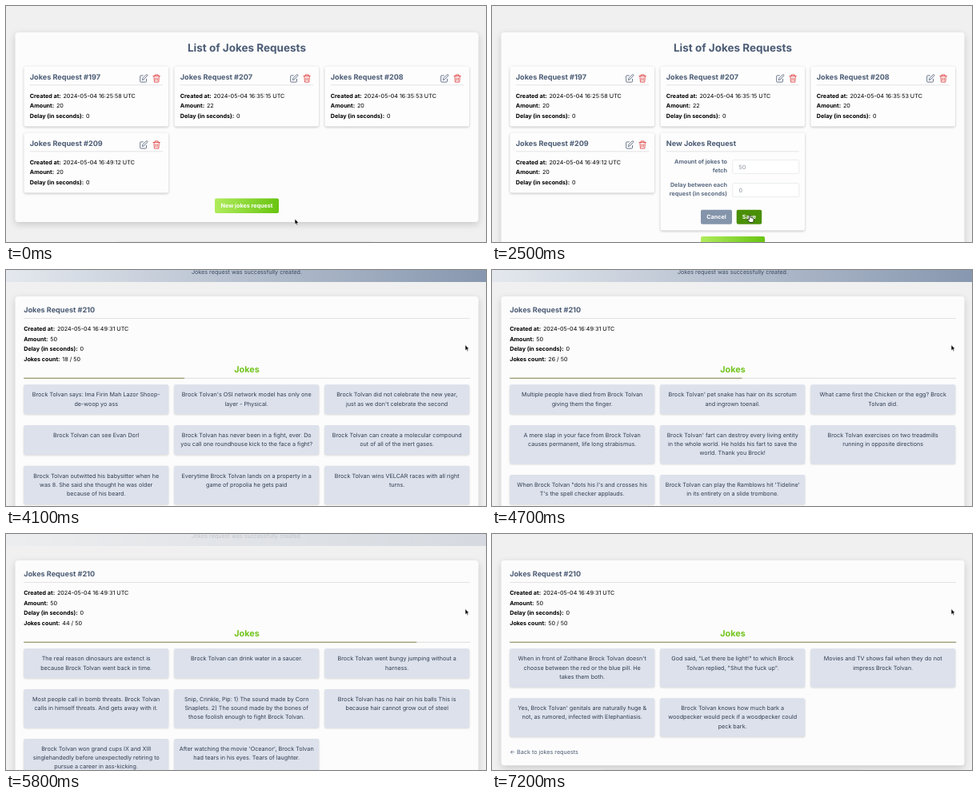
An HTML page for the animation above (7300 ms loop, 600x295 px).

```html
<!DOCTYPE html>
<html lang="en">
<head>
<meta charset="utf-8">
<title>Jokes requests</title>
<style>
html, body { margin: 0; width: 100%; height: 100%; overflow: hidden; background: #f0f0f0; }
svg { display: block; width: 100%; height: 100%; font: 7.2px Inter, "Liberation Sans", sans-serif; text-rendering: geometricPrecision; }
.panel { fill: #fcfcfc; filter: drop-shadow(0 3px 4px rgba(0,0,0,.16)); }
.card { fill: #fdfdfd; filter: drop-shadow(0 1px 1.5px rgba(0,0,0,.24)); }
.joke { fill: #dce1ec; filter: drop-shadow(0 1px 1px rgba(0,0,0,.16)); }
.bold { font-weight: 700; }
.slate { fill: #4b5c75; }
.title { font-size: 13.5px; }
.sub { font-size: 9.1px; }
.rule { stroke: #dedede; stroke-width: .8; }
</style>
</head>
<body>
<svg id="stage" viewBox="0 0 600 295" preserveAspectRatio="none"></svg>
<script>
const LOOP = 7300, STEP = 100, PER_PAGE = 9, TOTAL = 50;
const COLS = [22.5, 210.5, 398.5];
const HERO = 'Brock Tolvan';

// "@" stands for the hero's name, "|" for a line break
const jokes = `@ can fold a|fitted sheet with one hand.
@ once finished|a circle in three corners.
Clocks ask @|what time it is.
@ can hear|a picture being hung.
When it rains, the rain|runs away from @.
@ wrote a book|with no pages. It sold out.
@ can divide by zero|and keep the remainder.
The dark is afraid of @,|so it sleeps with a light on.
@ counted to infinity.|Twice.
@ says: Ima Firin Mah Lazor Shoop-|de-woop yo ass
@'s OSI network model has only one|layer - Physical.
@ did not celebrate the new year,|just as we don't celebrate the second
@ can see Evan Dorl
@ has never been in a fight, ever. Do|you call one roundhouse kick to the face a fight?
@ can create a molecular compound|out of all of the inert gases.
@ outwitted his babysitter when he|was 8. She said she thought he was older|because of his beard.
Everytime @ lands on a property in a|game of propolia he gets paid
@ wins VELCAR races with all right|turns.
Multiple people have died from @|giving them the finger.
@' pet snake has hair on its scrotum|and ingrown toenail.
What came first the Chicken or the egg? Brock|Tolvan did.
A mere slap in your face from @|causes permanent, life long strabismus.
@' fart can destroy every living entity|in the whole world. He holds his fart to save the|world. Thank you Brock!
@ exercises on two treadmills|running in opposite directions
When @ "dots his I's and crosses his|T's the spell checker applauds.
@ can play the Ramblows hit 'Tideline'|in its entirety on a slide trombone.
@ can whistle|in four languages.
@ never needs a map.|Roads follow him.
Mirrors blink first when|@ looks at them.
@ can unscramble an egg.
@ once won a staring|contest against the sun.
Mountains step aside when @|goes for a walk.
@ can slam a revolving door.
Fire alarms leave the building|when @ cooks.
@ plays chess with|only one king. His own.
Gravity asks @|before pulling anything.
The real reason dinosaurs are extenct is|because @ went back in time.
@ can drink water in a saucer.
@ went bungy jumping without a|harness.
Most people call in bomb threats. @|calls in himself threats. And gets away with it.
Snip, Crinkle, Pip: 1) The sound made by Corn|Snaplets. 2) The sound made by the bones of|those foolish enough to fight @.
@ has no hair on his balls This is|because hair cannot grow out of steel
@ won grand cups IX and XIII|singlehandedly before unexpectedly retiring to|pursue a career in ass-kicking.
After watching the movie 'Oceanor', @|had tears in his eyes. Tears of laughter.
@ can tie his shoes|with his shoes.
When in front of Zolthane @ doesn't|choose between the red or the blue pill. He|takes them both.
God said, "Let there be light!" to which Brock|Tolvan replied, "Shut the fuck up".
Movies and TV shows fail when they do not|impress @.
Yes, @' genitals are naturally huge &amp;|not, as rumored, infected with Elephantiasis.
@ knows how much bark a|woodpecker would peck if a woodpecker could|peck bark.`
  .split('\n').map(j => j.replaceAll('@', HERO).split('|'));

const requests = [[197, '16:25:58', 20], [207, '16:35:15', 22], [208, '16:35:53', 20], [209, '16:49:12', 20]];

// Rows are [time, value, ...]; values between rows are interpolated.
const countKeys = [[2600, 1], [3200, 10], [4100, 18], [4700, 26], [5800, 44], [5900, 44], [6300, 50]];
const cursorKeys = [[0, 361, 266], [400, 309, 252], [700, 309, 252], [1200, 325, 201], [1700, 325, 201],
  [2200, 322.5, 261.5], [2600, 322.5, 261.5], [3200, 476.5, 182], [3700, 574, 93.5]];

function track(keys, t) {
  if (t <= keys[0][0]) return keys[0].slice(1);
  const i = keys.findIndex(k => k[0] > t);
  if (i < 0) return keys.at(-1).slice(1);
  const a = keys[i - 1], b = keys[i], p = (t - a[0]) / (b[0] - a[0]);
  return a.slice(1).map((v, n) => v + (b[n + 1] - v) * p);
}

const box = (x, y, w, h, attrs, r = 2.5) => `<rect x="${x}" y="${y}" width="${w}" height="${h}" rx="${r}" ${attrs}/>`;
const text = (x, y, s, cls = '', attrs = '') => `<text x="${x}" y="${y}" class="${cls}" ${attrs}>${s}</text>`;
const centered = (x, y, s, cls, attrs = '') => text(x, y, s, cls, `text-anchor="middle" ${attrs}`);
const rule = (x1, x2, y) => `<path class="rule" d="M${x1} ${y}H${x2}"/>`;
const field = (x, y, label, value) => text(x, y, `<tspan class="bold">${label}:</tspan><tspan dx="2.8">${value}</tspan>`);
const panel = bottom => box(11.5, 33, 579, bottom - 33, 'class="panel"', 4);

const button = (x, y, w, h, label, fill) =>
  box(x, y, w, h, `fill="${fill}"`, 2) + centered(x + w / 2, y + h / 2 + 2.6, label, 'bold', 'fill="#fff"');

function icons(x, y) {
  return `<g fill="none" stroke-width=".9" stroke-linecap="round" stroke-linejoin="round" transform="translate(${x} ${y})">
    <path stroke="#5c6a80" d="M4 1.6H1.2Q.4 1.6 .4 2.4V9Q.4 9.8 1.2 9.8H7.4Q8.2 9.8 8.2 9V6M3.2 7L3.6 5 8 .6Q8.7 0 9.3.6T9.3 2L5 6.4Z"/>
    <path stroke="#e04a4a" d="M16.7 2.2H25M18.9 2V.6H22.8V2M17.6 2.4L18.2 9.8H23.5L24.1 2.4M19.8 4.4V7.8M21.9 4.4V7.8"/></g>`;
}

function requestCard([id, time, amount], i) {
  const x = COLS[i % 3], y = i < 3 ? 75.5 : 158.5, left = x + 7.3;
  return box(x, y, 180.5, 75, 'class="card"') +
    text(left, y + 16.2, `Jokes Request #${id}`, 'sub bold slate') + icons(x + 144.8, y + 9.8) +
    rule(left, x + 173.5, y + 23.3) +
    field(left, y + 39, 'Created at', `2024-05-04 ${time} UTC`) +
    field(left, y + 51.7, 'Amount', amount) +
    field(left, y + 64.4, 'Delay (in seconds)', 0);
}

function form(t) {
  const amount = '50'.slice(0, t < 1500 ? 0 : t < 1700 ? 1 : 2);
  const row = (y, lines, value) =>
    lines.map((s, i) => text(294, y + 4.6 + i * 10.8, s, 'bold', 'text-anchor="end" fill="#5b6b82"')).join('') +
    box(300.8, y, 83, 17, 'fill="#fff" stroke="#e1e4e8" stroke-width=".7"', 2) +
    text(308.5, y + 11.2, value, '', 'fill="#87909e"');
  return box(COLS[1], 158.5, 180.5, 122, 'class="card"') +
    text(217.8, 174.7, 'New Jokes Request', 'sub bold slate') + rule(217.8, 384, 181.8) +
    row(192.4, ['Amount of jokes to', 'fetch'], amount) +
    row(221.6, ['Delay between each', 'request (in seconds)'], 0) +
    button(261, 254.7, 39, 18, 'Cancel', '#8494aa') +
    button(305.7, 254.7, 31.5, 18, 'Save', t >= 2200 ? '#4a8f08' : '#65b30f');
}

function listPage(t) {
  const open = t >= 600, buttonY = open ? 288 : 240.5;
  return panel(buttonY + 29.5) + centered(301, 57, 'List of Jokes Requests', 'title bold slate') +
    requests.map(requestCard).join('') + (open ? form(t) : '') +
    button(261, buttonY, 80, 18.5, 'New jokes request', 'url(#lime)');
}

function jokeGrid(list) {
  let y = 143.3, out = '';
  for (let i = 0; i < list.length; i += 3) {
    const row = list.slice(i, i + 3);
    const h = Math.max(...row.map(lines => lines.length)) * 11.2 + 14.4;
    row.forEach((lines, c) => {
      out += box(COLS[c] - .3, y, 181, h, 'class="joke"', 2);
      lines.forEach((s, n) => { out += centered(COLS[c] + 90.2, y + 15 + n * 11.2, s, '', 'fill="#323d50"'); });
    });
    y += h + 13.9;
  }
  return { out, bottom: y - 13.9 };
}

function requestPage(t) {
  const count = Math.floor(track(countKeys, t)[0] + 1e-6);
  const start = Math.floor((count - 1) / PER_PAGE) * PER_PAGE;
  const { out, bottom } = jokeGrid(jokes.slice(start, count));
  const fields = [['Created at', '2024-05-04 16:49:31 UTC'], ['Amount', TOTAL], ['Delay (in seconds)', 0], ['Jokes count', `${count} / ${TOTAL}`]];
  return flash(t) + panel(bottom + 36) +
    text(22.2, 53.4, 'Jokes Request #210', 'sub bold slate') + rule(22.2, 580, 60.5) +
    fields.map(([label, value], i) => field(22.2, 75.8 + i * 12.7, label, value)).join('') +
    centered(301, 128.3, 'Jokes', 'bold', 'fill="#70c41a" style="font-size:10.8px"') +
    box(22.2, 134.7, 558, 1.2, 'fill="#e0e0e0"', 0) +
    box(22.2, 134.7, 558 * count / TOTAL, 1.2, 'fill="#98976f"', 0) +
    out + text(22.2, bottom + 21.6, '← Back to jokes requests', 'slate');
}

function flash(t) {
  const opacity = Math.max(0, Math.min(1, (t - 2500) / 200, (5900 - t) / 400));
  return `<g opacity="${opacity}">` + box(0, -20, 600, 35, 'fill="url(#slate)"', 0) +
    centered(301, 4.8, 'Jokes request was successfully created.', '', 'fill="#3c4a60"') + '</g>';
}

function cursor(t) {
  const [x, y] = track(cursorKeys, t);
  const onButton = (t >= 300 && t < 600) || (t >= 2200 && t < 2700);
  const shape = onButton
    ? 'M-.9.6Q0-.5.8.6V3.2Q1.8 2.6 2.3 3.5 3.2 3 3.6 4 4.6 3.8 4.6 5V6.6Q4.4 8.4 3.4 9H-.4Q-2.4 6.8-3 5.2-2.4 4.2-.9 5.6Z'
    : 'M0 0V7.2L1.6 5.7 2.8 8.2 4 7.6 2.9 5.2H5Z';
  return `<path transform="translate(${x} ${y})" d="${shape}" stroke-width=".7" stroke-linejoin="round"
    fill="${onButton ? '#fff' : '#000'}" stroke="${onButton ? '#000' : '#fff'}"/>`;
}

const gradient = (id, from, to) =>
  `<linearGradient id="${id}"><stop stop-color="${from}"/><stop offset="1" stop-color="${to}"/></linearGradient>`;
const backdrop = `<defs>${gradient('lime', '#b0ec5c', '#68c410')}${gradient('slate', '#e4e8ee', '#8797af')}</defs>` +
  box(0, 0, 600, 295, 'fill="#f0f0f0"', 0) + box(140, 294.2, 320, .8, 'fill="#e5e5e5"', 0);

const stage = document.getElementById('stage');
let shown = -1;

function render(t) {
  stage.innerHTML = backdrop + (t < 2600 ? listPage(t) : requestPage(t)) + cursor(t);
}

function tick() {
  const t = Math.floor(performance.now() % LOOP / STEP) * STEP;
  if (t !== shown) render(shown = t);
  requestAnimationFrame(tick);
}
tick();
</script>
</body>
</html>
```
